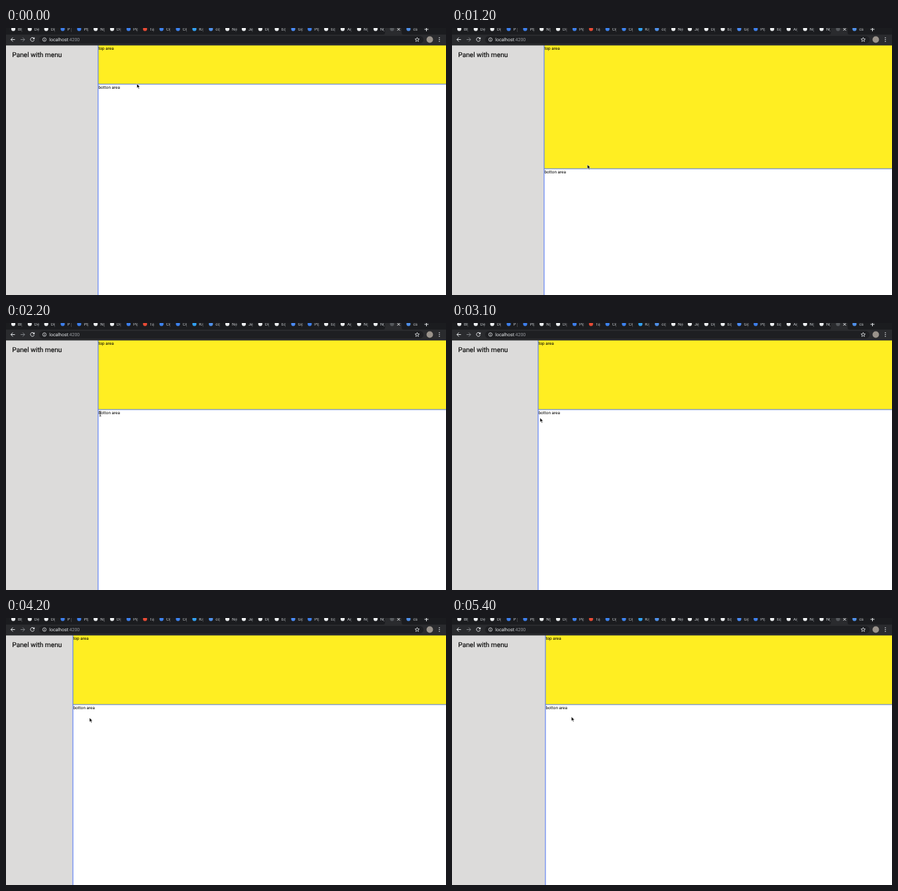
Write an HTML page that moves like this. It is 664 by 404 pixels and loops after 5600 ms.

```html
<!DOCTYPE html>
<html lang="en">
<head>
<meta charset="utf-8">
<title>Split panels</title>
<style>
  html, body { margin: 0; width: 100%; height: 100%; overflow: hidden; background: #fff; }
  svg { display: block; width: 664px; height: 404px; }
  text { font-family: Roboto, Arial, sans-serif; text-rendering: geometricPrecision; white-space: pre; }
  .small { font-size: 6.4px; }
  .menu { font-size: 10.2px; stroke: #000; stroke-width: .15; }
  .url { font-size: 7px; fill: #e8eaed; }
  .tab { font-size: 6.2px; fill: #c3c6ca; }
  .line { fill: none; stroke: #e4e6e9; stroke-width: 1; }
  .thin { stroke-width: .8; }
</style>
</head>
<body>
<svg viewBox="0 0 664 404">
  <rect width="664" height="404" fill="#fff"/>

  <rect id="side" y="26" height="378" fill="#dcdbda"/>
  <rect id="top" y="26" fill="#ffee22"/>
  <rect id="hLine" width="664" height="1" fill="#4a72e8"/>
  <rect id="vLine" y="26" width="1" height="378" fill="#4a72f5"/>
  <text id="topText" class="small" y="33.2">top area</text>
  <text id="bottomText" class="small">botton area</text>
  <text class="menu" x="9.3" y="43.5">Panel with<tspan id="menuEnd"> menu</tspan></text>
  <text id="menuWrap" class="menu" x="9.3" y="52.6">menu</text>

  <rect width="664" height="10" fill="#1b1c1f"/>
  <rect y="10" width="664" height="16.4" fill="#2a2b2e"/>
  <path d="M569 10Q572 10 572 7V0H597V7Q597 10 600 10Z" fill="#2a2b2e"/>
  <g id="tabs"></g>
  <path class="line" d="M590.5 0l4 4m0-4l-4 4M634.5 -1v6m-3-3h6"/>

  <path class="line" d="M13.5 17.5H7.5M10.3 14.5l-3 3 3 3"/>
  <path class="line" d="M22 17.5h6M25.2 14.5l3 3-3 3" style="stroke:#808388"/>
  <path class="line" d="M42.2 15.6A2.9 2.9 0 1 0 42.6 18.2"/>
  <path d="M43.2 13.8v3.2H40z" fill="#e4e6e9"/>
  <rect x="50" y="12" width="580" height="11.5" rx="5.75" fill="#1e1f22"/>
  <circle class="line thin" cx="58" cy="17.5" r="2.7"/>
  <path class="line thin" d="M58 17v2.2M58 15.6v.8"/>
  <text class="url" x="65.2" y="19.9">localhost<tspan fill="#999ca1">:4200</tspan></text>
  <path id="star" class="line thin"/>
  <circle cx="639.5" cy="17.5" r="4.9" fill="#9a938b"/>
  <path d="M654 14.7h0M654 17.5h0M654 20.3h0" stroke="#e4e6e9" stroke-width="1.6" stroke-linecap="round"/>

  <path id="arrow" d="M0 0V6.3L1.5 5 2.6 7.6 3.7 7.1 2.6 4.6H4.6Z" fill="#000" stroke="#fff" stroke-width=".5"/>
  <path id="beam" class="thin" d="M-1.5 -3.5H1.5M0 -3.5V3.5M-1.5 3.5H1.5" fill="none" stroke="#222"/>
</svg>
<script>
const LOOP = 5600, STEP = 100;
const $ = id => document.getElementById(id);
const set = (el, attrs) => {
  for (const k in attrs) el.setAttribute(k, attrs[k]);
};
const show = (id, on) => set($(id), { visibility: on ? "visible" : "hidden" });

// Turning points of the hand: time, x, y.
const pointer = [
  [0, 197.5, 84.5], [800, 201.5, 282.5], [1600, 207, 131], [2200, 142.2, 137.3],
  [2400, 179, 143], [2800, 141, 143.5], [2900, 141, 143.5], [3750, 79, 144.2],
  [4200, 126, 151], [4700, 180.2, 149.5]
];
// Turning points of the vertical divider: time, x.
const sideWidth = [[2900, 139], [3750, 67], [4700, 141]];
const DROP = 1600, LAG = 22; // the horizontal divider trails the hand until it is dropped

const ease = p => (1 - Math.cos(Math.PI * p)) / 2;

function at(keys, t) {
  const next = keys.findIndex(k => k[0] > t);
  if (next === 0) return keys[0].slice(1);
  if (next < 0) return keys[keys.length - 1].slice(1);
  const a = keys[next - 1], b = keys[next], p = ease((t - a[0]) / (b[0] - a[0]));
  return a.slice(1).map((v, i) => v + (b[i + 1] - v) * p);
}

function buildTabs() {
  const names = "BI De Di P PE N( Di Pc Ta Cr Cr Ki cc Ne Je Di Ec Gc PE Ec Ai N( N( . cs".split(" ");
  const tint = { P: "#3d7eea", C: "#3d82ee", K: "#31a0f2", T: "#e64a35", G: "#4a8af4", c: "#4f8fe8", ".": "#55585c" };
  const add = (tag, attrs, text = "") => {
    const el = document.createElementNS("http://www.w3.org/2000/svg", tag);
    set(el, attrs);
    el.textContent = text;
    $("tabs").append(el);
  };
  names.forEach((name, i) => {
    const x = 11 + i * 24.85;
    add("circle", { cx: x, cy: 1.5, r: 3.1, fill: tint[name[0]] || "#eceef0" });
    if (name !== ".") add("text", { class: "tab", x: x + 7, y: 3.8 }, name);
    if (i < 22) add("rect", { x: x + 12.5, y: 0, width: 0.8, height: 6, fill: "#4b4d51" });
  });
}

function buildStar() {
  const pts = Array.from({ length: 10 }, (_, i) => {
    const r = i % 2 ? 1.5 : 3.4, a = i * Math.PI / 5 - Math.PI / 2;
    return `${620.5 + r * Math.cos(a)} ${17.7 + r * Math.sin(a)}`;
  });
  set($("star"), { d: `M${pts.join("L")}Z` });
}

function draw(t) {
  const [px, py] = at(pointer, t);
  const x = Math.round(at(sideWidth, t)[0]);
  const y = Math.round(at(pointer, Math.max(0, Math.min(t - LAG, DROP)))[1]);
  const wrapped = x < 99;
  const onText = px < x + 33 && py > y + 2 && py < y + 9;

  set($("side"), { width: x });
  set($("top"), { x, width: 664 - x, height: y - 26 });
  set($("hLine"), { x, y: y - 0.5 });
  set($("vLine"), { x: x - 0.5 });
  set($("topText"), { x: x + 0.4 });
  set($("bottomText"), { x: x + 0.4, y: y + 7.2 });
  show("menuEnd", !wrapped);
  show("menuWrap", wrapped);
  for (const id of ["arrow", "beam"]) set($(id), { transform: `translate(${px} ${py})` });
  show("arrow", !onText);
  show("beam", onText);
}

buildTabs();
buildStar();
const start = performance.now();
function frame() {
  const t = (performance.now() - start) % LOOP;
  draw(Math.floor(t / STEP) * STEP);
  requestAnimationFrame(frame);
}
frame();
</script>
</body>
</html>
```
